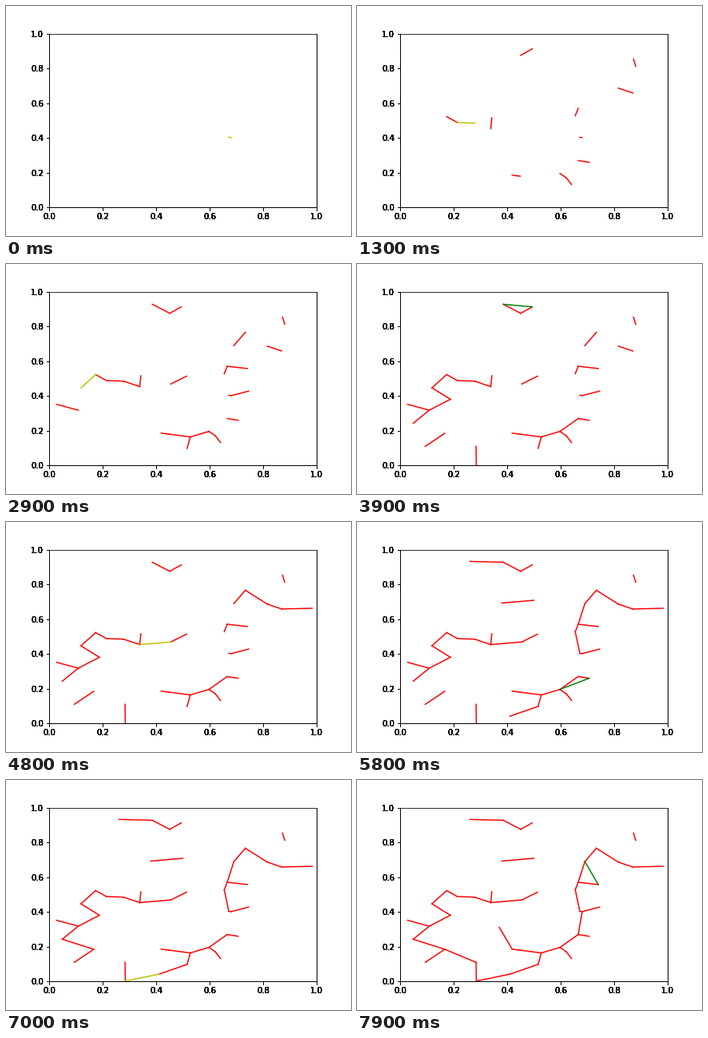
Write a matplotlib script that moves like this. It is 432 by 288 pixels and loops after 8000 ms.

```python
"""Kruskal's minimum spanning tree, one candidate edge per frame."""
from itertools import combinations

import matplotlib.pyplot as plt
import numpy as np
from matplotlib.animation import FuncAnimation
from matplotlib.collections import LineCollection

FRAMES = 80
INTERVAL = 100
LABEL_PASSES = 9  # repeated drawing gives the labels their dense black look

# The graph's nodes, in thousandths of the unit square; all else follows
NODES = np.array([
    (174, 522), (214, 488), (279, 484), (339, 453), (343, 515), (119, 446),
    (188, 380), (109, 317), (49, 242), (28, 351), (167, 184), (94, 109),
    (284, 109), (285, 1), (411, 41), (516, 97), (528, 163), (419, 185),
    (439, 181), (449, 179), (598, 195), (622, 169), (641, 131), (666, 269),
    (707, 259), (672, 403), (681, 401), (746, 427), (655, 527), (666, 570),
    (741, 557), (691, 689), (734, 766), (816, 686), (870, 658), (984, 662),
    (873, 853), (881, 812), (386, 927), (451, 875), (494, 912), (261, 932),
    (380, 692), (500, 708), (455, 468), (514, 513), (371, 310),
]) / 1000


def length(edge):
    a, b = edge
    return np.hypot(*(NODES[a] - NODES[b]))


def kruskal(count):
    """Return the shortest edges in order, each with its accepted flag."""
    group = list(range(len(NODES)))
    steps = []
    for a, b in sorted(combinations(range(len(NODES)), 2), key=length)[:count]:
        ga, gb = group[a], group[b]
        steps.append((NODES[[a, b]], ga != gb))
        group = [ga if g == gb else g for g in group]
    return steps


def add_axes(name, **kwargs):
    return fig.add_axes([0.125, 0.125, 0.775, 0.755], label=name,
                        xlim=(0, 1), ylim=(0, 1), **kwargs)


steps = kruskal(FRAMES)

plt.rcParams.update({"font.family": "DejaVu Sans", "font.size": 10})
fig = plt.figure(figsize=(6, 4), dpi=72, facecolor="white")
ax = add_axes("plot")
for k in range(1, LABEL_PASSES):
    add_axes(f"pass {k}", facecolor="none").spines["top"].set_visible(False)

tree = LineCollection([], colors="r", linewidths=1.5, capstyle="projecting", zorder=2)
ax.add_collection(tree, autolim=False)
current, = ax.plot([], [], lw=1.5, zorder=3)


def update(i):
    tree.set_segments([edge for edge, accepted in steps[:i] if accepted])
    edge, accepted = steps[i]
    current.set_data(edge[:, 0], edge[:, 1])
    current.set_color("y" if accepted else "g")
    return tree, current


anim = FuncAnimation(fig, update, frames=FRAMES, interval=INTERVAL,
                     init_func=lambda: (tree, current), repeat=True, repeat_delay=0)
plt.show()
```
